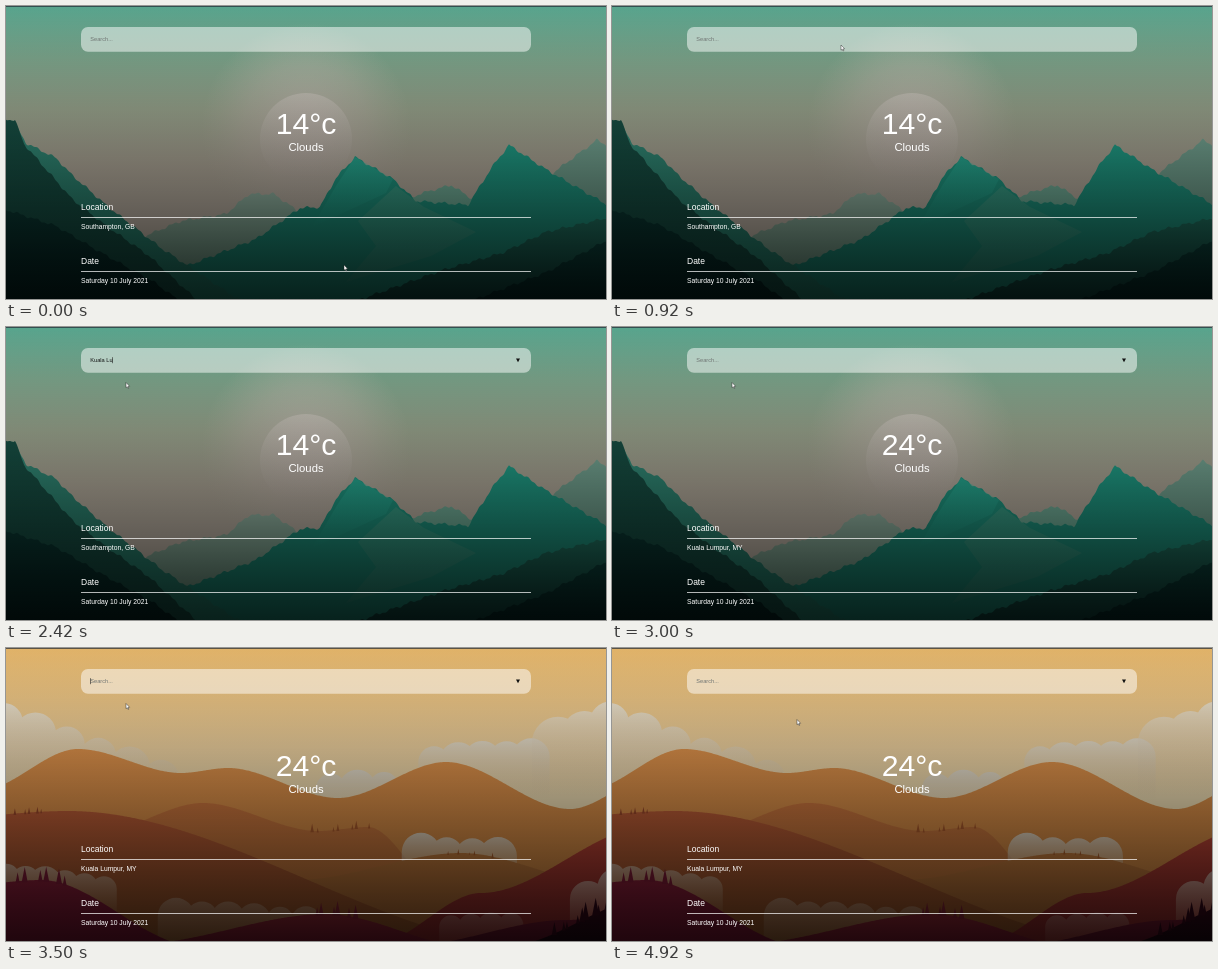
An HTML page with a canvas that plays this animation: 600 by 293 pixels, repeating every 5010 ms.

```html
<!DOCTYPE html>
<html lang="en">
<head>
<meta charset="utf-8">
<title>Weather</title>
<style>
  html, body { margin: 0; width: 100%; height: 100%; overflow: hidden; background: #57a48d; }
  canvas { display: block; width: 600px; height: 293px; }
</style>
</head>
<body>
<canvas id="stage"></canvas>
<script>
const W = 600, H = 293, LOOP = 5010;
const scale = Math.max(1, window.devicePixelRatio || 1);
const FONT = '"Liberation Sans", Arial, sans-serif';

const clamp = v => Math.min(1, Math.max(0, v));
const progress = (t, start, end) => clamp((t - start) / (end - start));
const smooth = p => p * p * (3 - 2 * p);
const mix = (a, b, p) => a + (b - a) * p;

function seeded(seed) {
  return () => {
    const v = Math.sin(seed++ * 127.1) * 43758.5453;
    return v - Math.floor(v);
  };
}

function prepare(canvas) {
  canvas.width = W * scale;
  canvas.height = H * scale;
  const c = canvas.getContext('2d');
  c.scale(scale, scale);
  return c;
}

function vertical(c, y0, y1, ...colors) {
  const g = c.createLinearGradient(0, y0, 0, y1);
  colors.forEach((color, i) => g.addColorStop(i / (colors.length - 1), color));
  return g;
}

// Height as a function of x through a few peaks and valleys.
function ridge(points, ease, rough = 0) {
  return x => {
    let i = 1;
    while (i < points.length - 1 && points[i][0] < x) i++;
    const [x0, y0] = points[i - 1], [x1, y1] = points[i];
    const noise = Math.sin(x * 0.37) + 0.6 * Math.sin(x * 0.91 + 1);
    return mix(y0, y1, ease(progress(x, x0, x1))) + rough * noise;
  };
}

function land(c, points, top, bottom, ease, rough) {
  const height = ridge(points, ease, rough);
  const first = points[0][0], last = points[points.length - 1][0];
  c.beginPath();
  c.moveTo(first, H + 5);
  for (let x = first; x <= last; x++) c.lineTo(x, height(x));
  c.lineTo(last, H + 5);
  c.fillStyle = vertical(c, Math.min(...points.map(p => p[1])), H, top, bottom);
  c.fill();
  return height;
}

const mountain = (c, points, top, bottom) => land(c, points, top, bottom, p => p, 1);
const hill = (c, points, top, bottom) => land(c, points, top, bottom, smooth, 0);

function polygon(c, points, fill) {
  c.beginPath();
  points.forEach(p => c.lineTo(...p));
  c.closePath();
  c.fillStyle = fill;
  c.fill();
}

function disc(c, x, y, r, fill) {
  c.beginPath();
  c.arc(x, y, r, 0, Math.PI * 2);
  c.fillStyle = fill;
  c.fill();
}

// Puffs strung between two points, merged and fading out below.
function cloudBank(c, [x0, y0], [x1, y1], count, radius, strength = 0.85) {
  const random = seeded(x0 + 31);
  const top = Math.min(y0, y1) - radius, depth = Math.abs(y1 - y0) + radius * 3.2;
  c.beginPath();
  for (let i = 0; i < count; i++) {
    const p = i / (count - 1), x = mix(x0, x1, p), y = mix(y0, y1, p);
    const r = radius * (0.85 + 0.3 * random());
    c.moveTo(x + r, y);
    c.arc(x, y, r, 0, Math.PI * 2);
    c.rect(x - r, y, r * 2, depth);
  }
  c.fillStyle = vertical(c, top, top + depth, `rgba(240,235,222,${strength})`, 'rgba(240,215,175,0)');
  c.fill();
}

function trees(c, height, from, to, count, size, color) {
  const random = seeded(from + 7);
  for (let i = 0; i < count; i++) {
    const x = mix(from, to, (i + random()) / count), h = size * (0.35 + 0.65 * random());
    const y = height(x) + 1.5, w = h * 0.2;
    polygon(c, [[x - w, y], [x - w * 0.4, y - h * 0.6], [x, y - h], [x + w * 0.4, y - h * 0.6], [x + w, y]], color);
  }
}

function shade(c) {
  c.fillStyle = vertical(c, 0, H, 'rgba(0,0,0,0)', 'rgba(0,0,0,.75)');
  c.fillRect(0, 0, W, H);
  c.fillStyle = 'rgba(35,45,55,.7)';
  c.fillRect(0, 0, W, 1);
}

function paintPeaks(c) {
  c.fillStyle = vertical(c, 0, 210, '#57a48d', '#84af94', '#aebaa0', '#c8c0ae', '#d4c8b9');
  c.fillRect(0, 0, W, H);

  const glow = c.createRadialGradient(300, 122, 20, 300, 122, 105);
  glow.addColorStop(0, 'rgba(222,206,199,.65)');
  glow.addColorStop(0.5, 'rgba(218,206,194,.4)');
  glow.addColorStop(1, 'rgba(210,206,190,0)');
  disc(c, 300, 122, 105, glow);
  disc(c, 300, 133, 46, vertical(c, 87, 172, 'rgba(245,236,230,.42)', 'rgba(235,225,218,0)'));

  mountain(c, [[520, 188], [556, 160], [591, 134], [612, 145]], '#85bda8', '#74a08e');
  mountain(c, [[120, 238], [175, 215], [220, 208], [243, 188], [268, 188], [310, 218], [340, 245]], '#a6ccb8', '#6b9680');
  mountain(c, [[380, 205], [413, 188], [445, 179], [485, 205]], '#83c8af', '#5c9a85');
  mountain(c, [[150, 272], [250, 233], [294, 202], [314, 201], [330, 172], [349, 151], [387, 173], [410, 195],
    [462, 199], [486, 161], [503, 139], [541, 164], [605, 201]], '#26b69c', '#1c8773');
  polygon(c, [[349, 151], [387, 173], [380, 187], [352, 200], [306, 221], [330, 180]],
    vertical(c, 151, 221, 'rgba(58,225,195,.4)', 'rgba(58,225,195,0)'));
  polygon(c, [[390, 180], [418, 201], [470, 226], [425, 250], [340, 276], [370, 240], [352, 215]],
    vertical(c, 180, 276, 'rgba(115,195,165,.35)', 'rgba(90,150,128,.2)'));

  mountain(c, [[6, 113], [20, 137], [50, 152], [65, 168], [100, 199], [155, 242], [235, 295]], '#3da28c', '#23806c');
  mountain(c, [[-4, 113], [9, 114], [18, 138], [66, 193], [99, 219], [142, 249], [192, 295]], '#1b5b4e', '#164f44');
  mountain(c, [[-5, 202], [50, 220], [94, 246], [148, 276], [175, 296]], '#0c403a', '#042422');
  mountain(c, [[350, 295], [437, 264], [496, 247], [540, 226], [605, 211]], '#257f6b', '#0f433c');
  mountain(c, [[465, 295], [541, 266], [605, 232]], '#0f4c44', '#042826');
  shade(c);
}

function paintHills(c) {
  c.fillStyle = vertical(c, 0, 150, '#e0b268', '#f1c987', '#fddea8', '#ffecbf');
  c.fillRect(0, 0, W, H);

  cloudBank(c, [-2, 74], [155, 130], 6, 19);
  cloudBank(c, [325, 141], [378, 139], 3, 17);
  cloudBank(c, [428, 114], [525, 109], 5, 18);
  cloudBank(c, [552, 95], [605, 75], 3, 24);

  hill(c, [[-25, 142], [72, 101], [175, 125], [222, 120], [332, 150], [440, 114], [564, 161], [645, 130]], '#ec9b50', '#d98c42');
  const middle = hill(c, [[90, 185], [197, 155], [312, 183], [362, 179], [440, 245]], '#d87d42', '#c8803c');
  trees(c, middle, 300, 368, 7, 9, '#b5602f');

  cloudBank(c, [415, 204], [492, 208], 4, 18);
  const knoll = hill(c, [[290, 232], [455, 205], [600, 235]], '#cf8340', '#b36c35');
  trees(c, knoll, 435, 487, 5, 6, '#b5642f');

  const slope = hill(c, [[-90, 172], [62, 163], [540, 300]], '#c8623a', '#9c5a2a');
  trees(c, slope, 6, 40, 5, 8, '#a34d2c');

  cloudBank(c, [0, 230], [98, 241], 6, 15, 0.6);
  cloudBank(c, [170, 268], [300, 274], 6, 16, 0.35);
  hill(c, [[370, 295], [475, 245], [645, 178]], '#c84a38', '#93292c');
  cloudBank(c, [582, 251], [612, 240], 2, 20, 0.7);
  cloudBank(c, [445, 279], [505, 277], 4, 12, 0.3);

  const mound = hill(c, [[130, 296], [320, 266], [470, 300]], '#a02d3a', '#861c32');
  trees(c, mound, 304, 356, 6, 16, '#902837');
  const left = hill(c, [[-30, 236], [35, 232], [190, 298]], '#97223e', '#801735');
  trees(c, left, 4, 66, 6, 18, '#8b1e3b');
  hill(c, [[400, 298], [560, 272], [660, 262]], '#861f35', '#64132a');
  const right = hill(c, [[500, 298], [645, 250]], '#3c0a1c', '#200812');
  trees(c, right, 548, 604, 9, 19, '#38091a');
  shade(c);
}

function scene(paint) {
  const canvas = document.createElement('canvas');
  paint(prepare(canvas));
  return canvas;
}

const ctx = prepare(document.getElementById('stage'));
const peaks = scene(paintPeaks), hills = scene(paintHills);

const QUERY = 'Kuala Lumpur';
const CLICK = 1250, TYPE_START = 1900, TYPE_END = 2600, SUBMIT = 2760, RESULT = 2870;

const moves = [
  { start: 80, end: 880, x: 229, y: 39 },
  { start: 1100, end: 1660, x: 120, y: 55.5 },
  { start: 3620, end: 4180, x: 184, y: 71.5 },
  { start: 4500, end: 4700, x: 185, y: 71.5 },
];

function pointer(t) {
  let x = 338, y = 259;
  for (const move of moves) {
    const p = smooth(progress(t, move.start, move.end));
    x = mix(x, move.x, p);
    y = mix(y, move.y, p);
  }
  return [x, y];
}

function text(str, x, y, size, color = '#fff', align = 'left') {
  ctx.font = `${size}px ${FONT}`;
  ctx.textAlign = align;
  ctx.fillStyle = color;
  ctx.fillText(str, x, y);
}

function caretOn(t) {
  if (t < CLICK) return false;
  if (t < TYPE_START) return t < CLICK + 400;
  return t < TYPE_END || (t - TYPE_END + 20) % 795 < 400;
}

function drawSearch(t) {
  ctx.beginPath();
  ctx.roundRect(75, 21, 450, 24.7, 7);
  ctx.fillStyle = 'rgba(255,255,255,.5)';
  ctx.fill();

  const count = t < SUBMIT ? Math.floor(progress(t, TYPE_START, TYPE_END) * QUERY.length) : 0;
  const typed = QUERY.slice(0, count);
  text(typed || 'Search...', 84.3, 35, 5.65, typed ? '#111' : '#707573');
  if (caretOn(t)) {
    ctx.fillStyle = '#222';
    ctx.fillRect(84.1 + (typed ? ctx.measureText(typed).width : 0), 30.2, 0.6, 6);
  }
  if (t >= 960) polygon(ctx, [[510, 31.5], [514, 31.5], [512, 35.3]], '#111');
}

function drawInfo(label, value, lineY) {
  text(label, 75, lineY - 7.5, 8.5);
  ctx.fillStyle = 'rgba(255,255,255,.7)';
  ctx.fillRect(75, lineY, 450, 1);
  text(value, 75, lineY + 12.2, 6.75);
}

function drawPointer(t) {
  ctx.save();
  ctx.translate(...pointer(t));
  polygon(ctx, [[0, 0], [0, 5.2], [1.2, 4.2], [2, 6], [2.8, 5.6], [2, 3.9], [3.6, 3.8]], '#fff');
  ctx.strokeStyle = '#222';
  ctx.lineWidth = 0.45;
  ctx.stroke();
  ctx.restore();
}

function draw(t) {
  ctx.drawImage(peaks, 0, 0, W, H);
  ctx.globalAlpha = smooth(progress(t, 3030, 3440));
  ctx.drawImage(hills, 0, 0, W, H);
  ctx.globalAlpha = 1;

  const found = t >= RESULT;
  drawSearch(t);
  text(found ? '24°c' : '14°c', 300, 128.3, 30.2, '#fff', 'center');
  text('Clouds', 300, 145.3, 11.3, '#fff', 'center');
  drawInfo('Location', found ? 'Kuala Lumpur, MY' : 'Southampton, GB', 211);
  drawInfo('Date', 'Saturday 10 July 2021', 265);
  drawPointer(t);
}

const origin = performance.now();
function frame() {
  draw((performance.now() - origin) % LOOP);
  requestAnimationFrame(frame);
}
frame();
</script>
</body>
</html>
```
